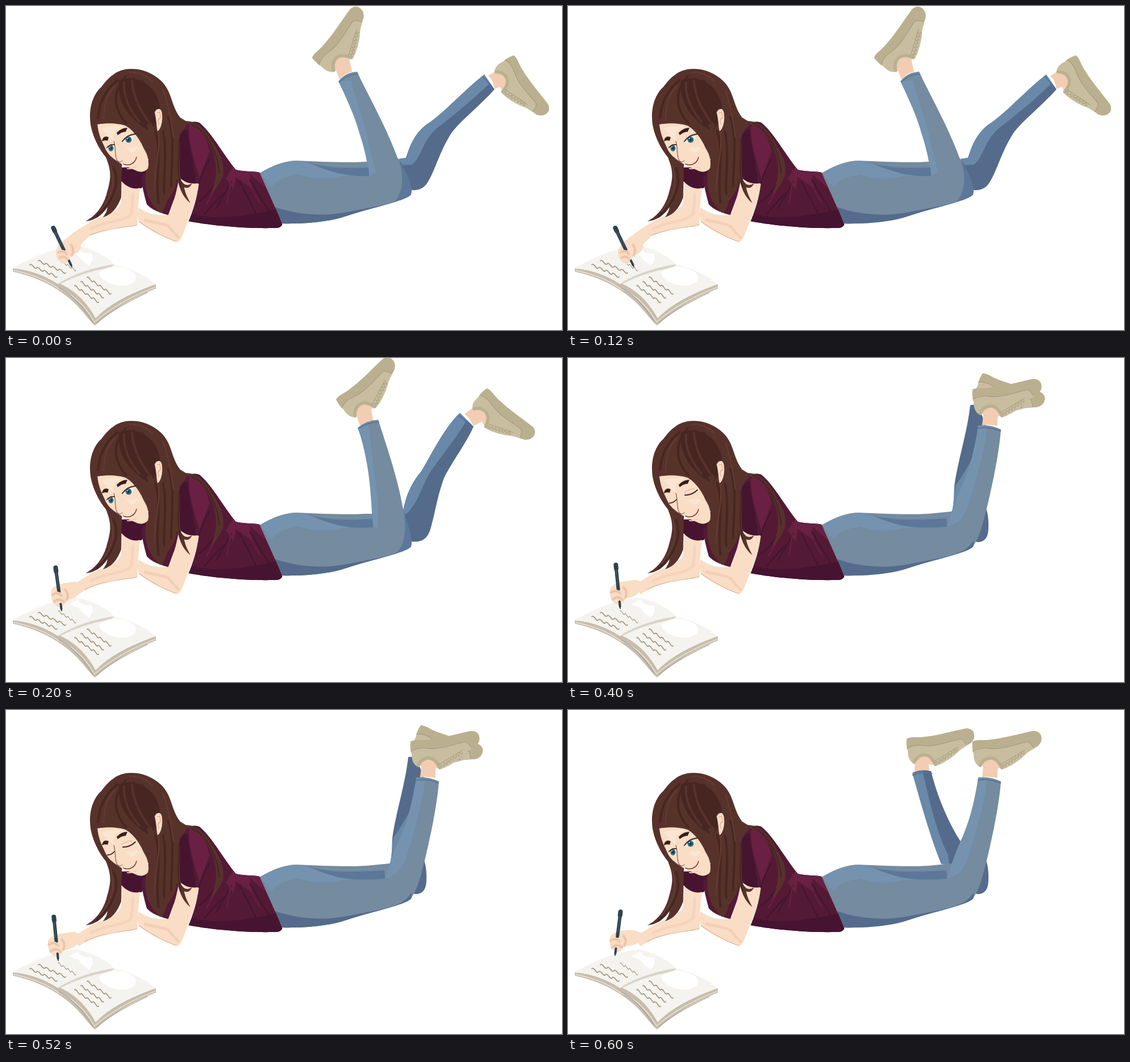
Animation, 980 px wide and 572 px high, one loop 800 ms. Source, as an HTML page:

```html
<!DOCTYPE html>
<html lang="en">
<head>
<meta charset="utf-8">
<title>Writing in a notebook</title>
<style>
html, body { margin: 0; width: 100%; height: 100%; overflow: hidden; background: #fff; }
svg { display: block; width: 100vw; height: 100vh; }
</style>
</head>
<body>
<svg id="stage" viewBox="0 0 980 572"></svg>
<script>
const STEP = 200;
const C = {
  jean: '#748ba0', jeanLight: '#7593ae', farLight: '#6a89a8', jeanDark: '#546b8c', jeanShade: '#5b789a', cuff: '#55739a',
  shoe: '#c8be9f', sole: '#bab08f', seam: '#a1967a', skin: '#f9ddc5', blush: '#f2cdb3', fold: '#dcae92',
  shirt: '#541a35', shirtLight: '#692043', shirtDark: '#461430',
  hair: '#57322b', hairDark: '#472622', hairLight: '#643c32',
  page: '#f5f3ef', edge: '#c6bdac', ink: '#a0967f', pen: '#2e424e', lash: '#36201f'
};

const fill = (d, c) => `<path d="${d}" fill="${c}"/>`;
const line = (d, c, w = 1) =>
  `<path d="${d}" fill="none" stroke="${c}" stroke-width="${w}" stroke-linecap="round" stroke-linejoin="round"/>`;

// Zigzag along a straight line: used for handwriting and laces
function wave(x1, y1, x2, y2, amp, n) {
  let d = `M${x1},${y1}`;
  const dx = (x2 - x1) / n, dy = (y2 - y1) / n;
  for (let i = 0; i < n; i++) {
    const s = i % 2 ? amp : -amp;
    d += `q${dx / 2 + s * 0.3},${dy / 2 + s} ${dx},${dy}`;
  }
  return d;
}

function shoe(x, y, turn, size = 1) {
  return `<g transform="translate(${x} ${y}) rotate(${turn}) scale(${size})">` +
    fill('M15,41 L24,27 L40,27 L50,45Z', C.blush) +
    fill('M0,-2 C6,-6 15,-4 27,-5 C57,-8 82,-16 107,-21 C119,-21 123,-13 121,-3 C115,9 99,14 93,21 C82,32 62,45 51,47 C46,44 45,32 33,30 C23,30 19,37 15,43 C5,40 2,30 2,20 C-1,12 -1,6 0,-2Z', C.shoe) +
    fill('M0,-2 C6,-6 15,-4 27,-5 C57,-8 82,-16 107,-21 C119,-21 123,-13 121,-3 C118,5 113,8 108,9 C103,4 102,-1 96,-2 C72,4 52,12 29,10 C18,8 8,11 1,16Z', C.sole) +
    line('M1,15 C9,10 18,8 30,10 C52,12 72,4 96,-2 C102,-1 103,4 108,9', C.seam) +
    line('M13,40 C17,31 25,25 35,27 C45,29 48,38 52,44', C.sole, 5) +
    line('M50,38 C63,31 75,22 92,13', C.seam) +
    line(wave(54, 42, 91, 17, 5, 14), C.seam) + '</g>';
}

const hem = 'C702,345 650,354 590,374 C560,382 520,385 485,384Z';
const hip = 'M447,295 C466,285 485,274 512,273';

function nearLeg(p) {
  const [ix, iy] = p.inner;
  return fill(`${hip} C560,275 600,277 635,275 ${p.near} ${hem}`, C.jean) +
    fill(`${hip} C550,280 575,292 612,299 C580,300 555,312 515,297 C495,301 477,306 468,320Z`, C.jeanLight) +
    fill(p.light, C.jeanLight) +
    fill(`M532,276 C570,288 610,286 ${ix - 1},${iy - 15} L${ix},${iy} C620,301 595,299 575,292 C555,287 545,281 532,276Z`, C.jeanShade) +
    fill(`M474,355 C520,371 565,371 600,364 C640,356 676,351 697,340 C708,333 712,326 715,322 L714,333 ${hem}`, C.jeanDark) +
    (p.knee ? fill(p.knee, C.jeanShade) : '') +
    line(p.cuffNear, C.cuff, 1.7);
}

function farLeg(p) {
  return fill(p.far, C.jeanDark) + fill(p.farLight, C.farLight) +
    (p.cuffFar ? line(p.cuffFar, C.cuff, 2) : '');
}

const bentLeg = {
  inner: [668, 298],
  near: 'L676,271 C704,225 718,170 723,119 Q745,117 763,126 C760,170 745,240 733,285 C727,310 720,323 714,333',
  light: 'M668,298 C677,270 684,247 695,225 C712,185 718,150 723,120 L739,124 C734,165 718,220 707,255 C700,278 690,292 668,298Z',
  cuffNear: 'M723,124 Q745,121 762,129',
  ankleNear: 'M733,88 L757,88 C760,98 756,108 757,120 Q744,117 730,119 Z',
  shoeNear: [713, 58, 0]
};
const kneeBump = 'M720,325 C735,326 741,316 741,300 C742,280 738,266 734,258 L700,290Z';

const poses = [
  {
    inner: [640, 300],
    near: 'L638,275 C632,235 610,180 586,133 Q598,117 619,116 C634,150 670,212 690,268 C702,290 716,310 714,333',
    light: 'M586,133 L608,131 C615,160 630,200 637,230 C641,255 652,288 652,294 L640,300 C636,270 630,245 623,225 C615,195 600,163 586,133Z',
    knee: 'M690,268 C702,292 702,329 684,346 C702,341 714,336 715,328 C716,312 702,288 690,268Z',
    cuffNear: 'M588,134 Q600,121 620,120',
    ankleNear: 'M575,97 L605,94 L610,116 Q596,119 588,130Z',
    shoeNear: [541, 93, -42],
    far: 'M692,270 L705,268 C712,246 720,226 740,210 C774,188 800,155 843,121 L861,147 C840,172 797,206 784,226 C765,256 756,290 745,308 C738,322 728,326 714,325Z',
    farLight: 'M692,270 L705,268 C712,246 720,226 740,210 C774,188 800,155 843,121 L853,136 C819,169 785,196 758,217 C734,238 731,270 715,280 L699,281Z',
    cuffFar: 'M840,125 Q850,132 857,149',
    ankleFar: 'M850,123 L875,108 L887,136 Q875,142 861,146 Q859,132 850,123Z',
    shoeFar: [893, 88, 65, 0.97],
    hand: 'M127,397 C112,405 94,418 89,430 C86,441 90,452 104,455 C113,453 111,445 116,440 C127,437 133,431 132,421 L148,405Z',
    fingers: 'M93,435 Q102,430 107,438 M95,444 Q103,440 108,447 M116,440 Q121,431 115,422',
    pen: [82, 389, 116, 460]
  },
  {
    inner: [647, 299],
    near: 'L646,275 C642,215 635,165 620,123 Q635,110 656,109 C669,150 690,210 699,262 C704,285 716,310 714,333',
    light: 'M620,123 L639,119 C645,165 651,215 655,250 C657,270 656,290 656,299 L647,299 C644,270 643,220 636,180 C632,157 626,140 620,123Z',
    knee: 'M699,264 C706,290 707,326 688,344 C703,341 714,336 715,328 C716,312 705,288 699,264Z',
    cuffNear: 'M622,124 Q636,114 657,113',
    ankleNear: 'M614,89 L643,86 L647,110 Q633,113 624,120Z',
    shoeNear: [583, 75, -31],
    far: 'M700,270 C705,241 716,219 732,200 C757,157 774,122 800,97 L824,121 C814,146 785,185 772,212 C760,245 757,270 750,295 C745,318 735,326 715,324Z',
    farLight: 'M700,270 C705,241 716,219 732,200 C757,157 774,122 800,97 L812,110 C793,142 768,172 746,204 C732,229 726,257 705,276Z',
    cuffFar: 'M798,102 Q811,109 820,125',
    ankleFar: 'M808,99 L831,82 L842,111 Q832,115 824,120 Q819,107 808,99Z',
    shoeFar: [846, 55, 50, 0.97],
    hand: 'M122,395 C105,397 84,399 80,410 C78,425 82,437 95,440 C103,438 105,431 108,427 C118,427 127,420 133,411 L148,401Z',
    fingers: 'M82,418 Q92,411 98,420 M85,430 Q94,422 102,431 M107,427 Q112,416 104,409',
    pen: [87, 367, 98, 446]
  },
  {
    ...bentLeg,
    far: `M709,83 L722,82 L737,120 L705,250 L676,274 C681,258 680,240 681,226 C687,182 704,130 709,83Z ${kneeBump}`,
    farLight: 'M711,180 C721,155 728,138 729,115 L735,140 L705,250 L676,274 C681,258 680,240 683,225 C692,213 700,200 711,180Z',
    ankleFar: '',
    shoeFar: [730, 29, 28, 0.98],
    hand: 'M120,392 C101,393 78,397 74,408 C73,421 77,433 89,436 C97,434 99,428 102,424 C114,424 123,417 129,409 L148,401Z',
    fingers: 'M76,414 Q86,408 92,416 M79,426 Q88,418 96,427 M101,423 Q106,412 98,405',
    pen: [84, 362, 92, 442],
    blink: true
  },
  {
    ...bentLeg,
    far: `M607,111 Q622,104 640,108 C650,150 670,198 692,232 L690,274 L658,272 C640,228 622,165 607,111Z ${kneeBump}`,
    farLight: 'M607,111 L625,108 C638,165 650,216 670,256 L672,272 L658,272 C640,228 622,165 607,111Z',
    cuffFar: 'M608,115 Q622,108 641,112',
    ankleFar: 'M613,84 L634,84 L637,108 Q620,106 610,111Z',
    shoeFar: [597, 53, 0, 0.98],
    hand: 'M120,390 C103,386 79,391 74,401 C72,414 75,425 88,428 C95,426 96,420 99,416 C111,417 121,414 128,408 L148,400Z',
    fingers: 'M75,407 Q85,401 91,409 M78,419 Q87,411 95,419 M99,416 Q105,407 98,399',
    pen: [93, 353, 83, 433]
  }
];

function legs(p) {
  return (p.ankleFar ? fill(p.ankleFar, C.blush) : '') + shoe(...p.shoeFar) + farLeg(p) +
    fill(p.ankleNear, C.blush) + nearLeg(p) + shoe(...p.shoeNear);
}

function hand(p) {
  const [x1, y1, x2, y2] = p.pen;
  const at = k => `${x1 + (x2 - x1) * k},${y1 + (y2 - y1) * k}`;
  return fill(p.hand, C.skin) +
    line(`M${at(0.04)} L${at(0.12)}`, C.pen, 8) +
    line(`M${at(0.1)} L${at(0.58)}`, C.pen, 6) +
    line(`M${at(0.15)} L${at(0.5)}`, '#4d616b', 1.2) +
    line(`M${at(0.85)} L${at(0.96)}`, C.pen, 4) +
    line(`M${at(0.95)} L${at(1)}`, C.pen, 2) +
    line(p.fingers, C.blush, 5) + line(p.fingers, C.fold, 0.8);
}

function eyes(p) {
  if (p.blink) {
    return line('M206,242 Q219,242 228,233 M179,256 Q186,256 191,250', C.lash, 1.8) +
      line('M205,237 Q215,230 223,231', C.fold);
  }
  const iris = (x, y, rx) => `<ellipse cx="${x}" cy="${y}" rx="${rx}" ry="5.5" fill="#32717d"/>` +
    `<circle cx="${x}" cy="${y}" r="2.5" fill="#183c47"/><circle cx="${x - 2}" cy="${y - 2}" r="1" fill="#cce8e8"/>`;
  return fill('M206,240 Q214,228 226,230 Q223,239 215,243Z M179,251 Q184,244 191,246 L190,255 Q184,258 179,251Z', '#f1eeeb') +
    iris(216, 236, 5.5) + iris(185, 251, 4.5) +
    line('M205,239 Q214,227 228,226 M178,250 Q184,243 191,245', C.lash, 1.8);
}

function book() {
  const scribble = [
    [57, 450, 105, 471], [42, 457, 90, 478], [143, 479, 185, 508],
    [132, 487, 172, 515], [121, 494, 163, 523]
  ].map(a => line(wave(...a, 4, 8), C.ink, 1.7)).join('');
  return fill('M12,463 C45,466 72,477 92,491 L95,489 C124,502 146,526 158,551 C183,525 224,505 264,491 L264,499 C225,514 185,537 157,564 C143,553 130,526 91,501 C66,485 43,476 12,469Z', C.edge) +
    line('M14,467 C45,473 71,484 91,498 C122,510 143,535 156,558 C184,533 224,511 262,497', '#e9e3d9', 1.5) +
    line('M94,498 C122,512 140,539 153,558 M160,560 C184,538 222,519 249,506', '#988d79') +
    fill('M12,463 C40,446 85,426 125,423 C158,430 180,444 191,457 C155,464 115,476 92,491 C70,477 45,466 12,463Z', C.page) +
    fill('M95,490 C115,475 150,462 191,457 C221,462 250,479 264,491 C225,504 181,526 158,551 C145,527 124,503 95,490Z', C.page) +
    fill('M91,491 C115,475 150,462 191,456 L185,462 C150,467 120,478 95,491Z', '#d9d3c8') +
    fill('M164,471 C180,456 207,457 224,470 C237,483 224,494 202,494 C181,491 165,482 164,471Z M112,435 L127,426 Q132,438 151,437 Q156,448 146,458 Q134,452 128,441Z', '#fff') +
    scribble + line(wave(92, 447, 123, 467, 4, 8), C.ink, 1.1);
}

function body() {
  return fill('M203,285 L251,284 L240,321 C225,327 211,318 203,309Z', C.shirtDark) +
    fill('M204,310 C215,322 228,324 236,321 C234,345 231,365 232,384 C228,390 215,390 200,391 C175,394 155,400 141,409 L128,417 L116,402 C132,392 150,379 168,372 C187,366 201,358 203,345 C205,330 205,320 204,310Z', C.skin) +
    line('M150,393 C176,379 205,382 220,368 C223,355 222,345 224,332', '#f6d3ba', 5) +
    line('M231,386 C220,391 173,391 139,409', C.fold, 1.2) +
    fill('M238,302 L310,225 L307,312 L286,369 C268,364 255,358 248,350 C244,335 240,320 238,302Z', C.shirt) +
    fill('M304,309 L340,312 C338,335 325,370 316,392 C310,409 306,416 302,416 C280,410 250,393 234,380 C231,371 231,364 234,356 C248,366 265,371 286,369 C294,355 300,330 304,309Z', C.skin) +
    line('M245,378 C260,382 277,383 287,389 C293,399 300,403 304,409', '#f5cfb5', 5) +
    line('M235,381 C258,398 285,411 301,416', C.fold, 1.3) +
    fill('M305,220 C316,204 331,202 341,206 C364,225 384,264 405,289 C420,293 436,291 447,294 C460,325 475,355 487,386 C483,393 477,392 470,392 C430,393 370,389 322,380 C330,360 337,338 340,313 C325,315 312,311 304,300Z', C.shirt) +
    fill('M323,210 C340,207 354,232 359,258 C350,277 347,295 342,309 C333,270 320,244 323,210Z M405,289 C420,293 436,291 447,294 L457,320 L430,297 L434,322 L405,302 L401,324 L388,305 C392,294 398,288 401,284Z', C.shirtLight) +
    fill('M307,222 L320,218 C322,252 335,285 334,313 C320,314 310,308 304,300Z M328,366 C365,380 430,370 476,359 L487,386 C483,393 477,392 470,392 C430,393 370,389 322,380Z', C.shirtDark) +
    line('M340,313 C344,298 350,283 358,271 M366,318 C357,332 346,342 336,348 M397,310 L370,358 M412,310 L440,365 M430,307 L463,362 M382,331 L350,367', C.shirtDark, 2.5) +
    line('M384,295 L353,350 M420,300 L447,347 M397,301 L390,347', C.shirtLight, 2);
}

function hair() {
  const locks = 'M197,131 C174,148 165,170 162,198 M211,124 C188,151 188,179 212,207 M225,128 C215,151 222,187 248,216 M240,132 C238,159 247,183 261,211 ' +
    'M263,221 C276,259 262,306 269,347 M277,222 C285,267 276,309 279,331 M286,196 C299,230 291,281 291,318 M190,286 C202,313 188,347 160,371';
  const shine = 'M191,142 C177,157 173,174 172,199 M218,117 C233,115 246,121 258,133 M269,224 C272,259 262,285 261,327 M184,282 C195,314 184,342 166,362 M278,149 C286,177 292,207 295,231';
  return fill('M149,209 C145,180 154,155 168,143 C182,124 198,110 222,111 C248,111 274,127 284,146 C292,160 295,182 307,197 L322,206 L306,228 C304,260 305,290 301,309 C298,328 290,333 283,346 C280,358 276,365 271,365 C263,356 250,342 248,326 C243,307 246,294 251,270 L205,275 C203,290 204,317 203,338 C196,357 187,368 171,373 C176,366 178,361 179,355 C168,371 155,379 140,380 C160,370 173,350 178,329 C187,300 184,287 176,267 C165,254 153,232 149,209Z', C.hair) +
    fill('M199,132 C225,119 257,135 268,164 C275,182 271,198 264,210 C254,195 247,219 240,213 C214,193 196,168 199,132Z', C.hairDark) +
    line(locks, C.hairDark, 4) + line(shine, C.hairLight, 2) +
    line('M222,132 C225,166 238,184 251,204 M208,135 C207,162 218,184 235,204', C.hair, 4) +
    fill('M318,203 C349,204 368,245 380,270 C387,295 381,312 359,334 C372,309 373,285 366,262 C356,232 337,211 318,208Z M304,218 C310,247 303,284 309,308 C314,317 320,318 328,313 C324,322 318,322 314,320 C316,332 321,340 325,348 C312,338 305,322 301,299 C298,269 303,245 304,218Z', C.hair) +
    line('M327,208 C360,223 374,269 376,295 M305,234 C306,270 300,291 308,319', C.hairDark, 2.5);
}

function face() {
  return fill('M161,209 C180,206 200,207 212,212 C228,222 238,240 243,252 C250,262 253,276 250,287 C244,294 236,294 228,290 C210,283 197,276 188,268 C180,262 176,255 172,245 C167,235 163,225 161,209Z', C.skin) +
    fill('M168,216 Q190,209 207,213 L191,220 L189,239 L178,227Z M211,251 Q228,246 235,250 L224,260Z', '#fbe6d3') +
    fill('M170,235 Q174,228 181,232 L179,238 Q174,236 169,239Z M195,224 Q203,215 214,215 L211,222 Q204,222 197,228Z', C.lash) +
    line('M190,239 C194,251 191,263 196,273 Q201,278 205,273', '#7c4e43', 1.1) +
    line('M207,279 C219,284 228,276 230,267', '#773d38', 1.5) +
    line('M214,287 Q223,288 229,284', C.blush, 2) +
    fill('M262,188 C265,180 274,179 275,190 C277,205 272,219 267,221 C265,211 265,199 262,188Z', C.skin) +
    line('M266,189 Q273,184 272,198 Q266,199 269,209', C.fold, 1.3);
}

const each = draw => poses.map((p, i) => `<g data-pose="${i}">${draw(p)}</g>`).join('');
const stage = document.getElementById('stage');
stage.innerHTML = each(legs) + body() + hair() + face() + each(eyes) + book() + each(hand);
const layers = [...stage.querySelectorAll('[data-pose]')];

function render(time) {
  const pose = Math.floor(time / STEP) % poses.length;
  for (const g of layers) g.style.display = +g.dataset.pose === pose ? '' : 'none';
}

const start = performance.now();
function tick() {
  render(performance.now() - start);
  requestAnimationFrame(tick);
}
tick();
</script>
</body>
</html>
```
